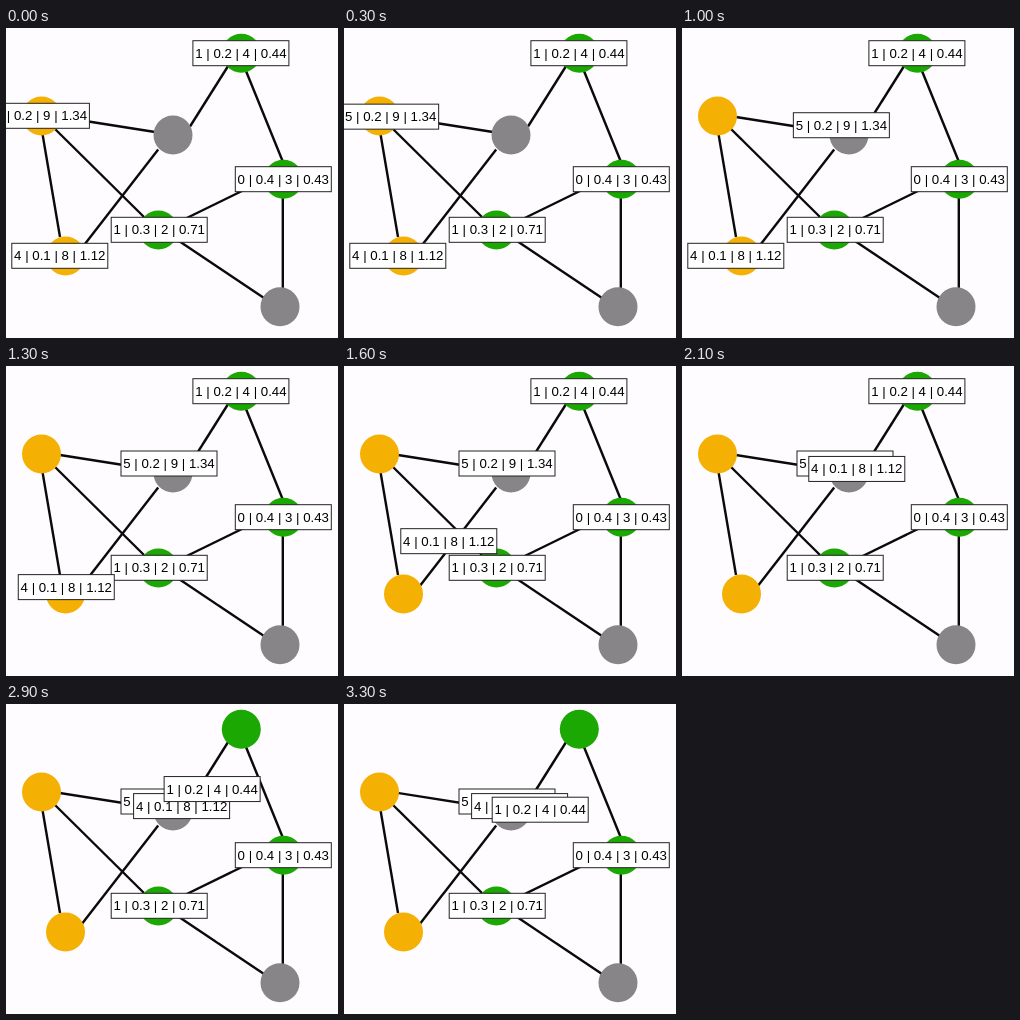
Recreate the animation shown at these times as an HTML page. Size 332 by 310 pixels, loop 3400 ms.

```html
<!DOCTYPE html>
<html lang="en">
<head>
<meta charset="utf-8">
<title>Messages between graph nodes</title>
<style>
  html, body { margin: 0; width: 100%; height: 100%; overflow: hidden; background: #fefcff; }
  svg { display: block; width: 332px; height: 310px; }
  line { stroke: #0a0a0a; stroke-width: 2.4; }
  rect { fill: #fff; stroke: #222; stroke-width: 1; }
  text { font: 13.25px "Liberation Sans", Arial, sans-serif; fill: #000; text-anchor: middle; }
</style>
</head>
<body>
<svg id="stage" viewBox="0 0 332 310"></svg>
<script>
const LOOP = 3400, STEP = 100, MOVE = 1000;
const YELLOW = '#f5b004', GREEN = '#1ba803', GRAY = '#878587';
const stage = document.getElementById('stage');

const edges = [
  [54, 89, 149, 104], [36.5, 106, 54, 209], [49, 101, 138, 189],
  [76.2, 219.6, 152.2, 121.6], [184, 98.5, 224, 35], [240, 43, 277, 134],
  [259.5, 151.5, 169.5, 195.5], [276.8, 170, 276.8, 260], [170, 211, 258, 270]
];
const nodes = [
  [35.5, 88, YELLOW], [59.5, 228, YELLOW], [167, 107, GRAY], [274, 278.7, GRAY],
  [235.3, 25.3, GREEN], [277.4, 151.3, GREEN], [152.4, 202, GREEN]
];
// Labels with an end point travel there from their start time, in stacking order.
const labels = [
  { text: '0 | 0.4 | 3 | 0.43', from: [229.3, 138.7] },
  { text: '1 | 0.3 | 2 | 0.71', from: [105.2, 189.3] },
  { text: '5 | 0.2 | 9 | 1.34', from: [-12.6, 75.3], to: [115, 85], start: 108 },
  { text: '4 | 0.1 | 8 | 1.12', from: [5.8, 215.3], to: [127.6, 89.6], start: 1152 },
  { text: '1 | 0.2 | 4 | 0.44', from: [186.9, 12.7], to: [148.2, 93.2], start: 2238 }
];

function add(parent, tag, attrs) {
  const el = document.createElementNS('http://www.w3.org/2000/svg', tag);
  for (const key in attrs) el.setAttribute(key, attrs[key]);
  return parent.appendChild(el);
}

function place(label, time) {
  const p = Math.min(1, Math.max(0, (time - label.start) / MOVE));
  const k = (1 - Math.cos(Math.PI * p)) / 2;
  const [x, y] = label.from.map((v, i) => v + (label.to[i] - v) * k);
  label.el.setAttribute('transform', `translate(${x} ${y})`);
}

for (const [x1, y1, x2, y2] of edges) add(stage, 'line', { x1, y1, x2, y2 });
for (const [cx, cy, fill] of nodes) add(stage, 'circle', { cx, cy, r: 19.5, fill });
for (const label of labels) {
  label.el = add(stage, 'g', { transform: `translate(${label.from})` });
  add(label.el, 'rect', { width: 96, height: 25 });
  add(label.el, 'text', { x: 48, y: 17 }).textContent = label.text;
}

const movers = labels.filter(label => label.to);
const origin = performance.now();
function draw() {
  const time = Math.floor(((performance.now() - origin) % LOOP) / STEP) * STEP;
  movers.forEach(label => place(label, time));
  requestAnimationFrame(draw);
}
draw();
</script>
</body>
</html>
```
